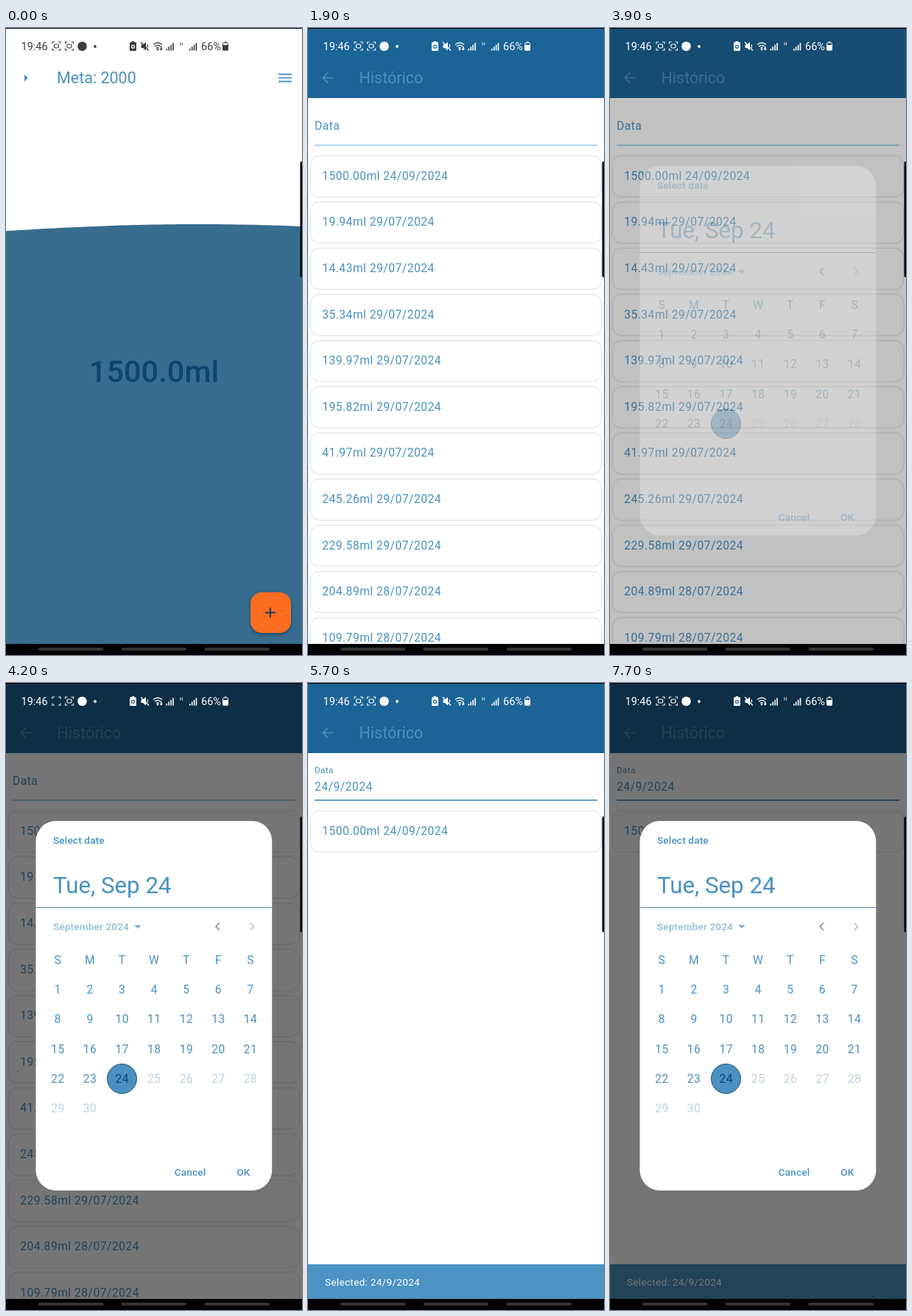
Write an HTML page that moves like this. It is 402 px wide and 850 px high and loops after 8000 ms.

```html
<!DOCTYPE html>
<html lang="pt">
<head>
<meta charset="utf-8">
<title>Hidratação</title>
<style>
  html, body { margin: 0; width: 100%; height: 100%; overflow: hidden; background: #fff; }
  svg { display: block; width: 100vw; height: 100vh; font-family: Roboto, sans-serif; }
  .page, #ripple { transform-origin: 201px 425px; }
  .card { fill: #fff; filter: drop-shadow(0 .8px .8px rgba(0, 0, 0, .3)); }
  .raised { filter: drop-shadow(0 2px 2.5px rgba(0, 0, 0, .35)); }
  .line { fill: none; stroke: currentColor; }
  #status { fill: currentColor; }
</style>
</head>
<body>
<svg viewBox="0 0 402 850" preserveAspectRatio="none">
  <defs>
    <radialGradient id="glow">
      <stop offset=".3" stop-color="#cfe4ec"/>
      <stop offset="1" stop-color="#e4f0f5"/>
    </radialGradient>
  </defs>
  <g id="home" class="page"></g>
  <rect id="scrim" width="402" height="850"/>
  <g id="history" class="page"></g>
  <g id="snack"></g>
  <g id="popup"></g>
  <rect id="barrier" width="402" height="850"/>
  <g id="dialog"></g>
  <g id="status"></g>
  <g id="system"></g>
</svg>
<script>
const LOOP = 8000, STEP = 100;
const BLUE = '#4a91c1', NAVY = '#0b4770', BAR = '#1c6496';
const DP = 402 / 411;
const BODY = 16 * DP, LABEL = 14 * DP, TITLE = 22 * DP;
const $ = id => document.getElementById(id);
const clamp = v => Math.min(1, Math.max(0, v));
const progress = (t, start, length) => clamp((t - start) / length);
const easeOut = (p, power) => 1 - (1 - p) ** power;
const range = n => [...Array(n).keys()];

// Text is placed by the middle of its capitals.
const text = (x, y, size, str, { fill = BLUE, weight = 400, gap = 0, anchor = 'start', extra = '' } = {}) =>
  `<text x="${x}" y="${y + size * 0.3555}" font-size="${size}" fill="${fill}" font-weight="${weight}"
    letter-spacing="${gap}" text-anchor="${anchor}" ${extra}>${str}</text>`;
const body = (x, y, str, opts) => text(x, y, BODY, str, { gap: 0.49, ...opts });
const label = (x, y, str, opts) => text(x, y, LABEL, str, { weight: 500, gap: 0.1, ...opts });
const rect = (x, y, w, h, fill, extra = '') =>
  `<rect x="${x}" y="${y}" width="${w}" height="${h}" fill="${fill}" ${extra}/>`;
const stroke = (d, color = BLUE, width = 1.7, extra = '') =>
  `<path d="${d}" fill="none" stroke="${color}" stroke-width="${width}" ${extra}/>`;

function buildHome() {
  $('home').innerHTML =
    rect(0, 0, 402, 850, '#fff') +
    '<path id="water" fill="#376d8f"/>' +
    '<circle id="ripple" cx="27.5" cy="67.5" r="19.5" fill="url(#glow)"/>' +
    `<path d="M25 63v9.4l4.8-4.7z" fill="${BLUE}"/>` +
    text(69, 67.5, TITLE, 'Meta: 2000') +
    stroke('M370 62.7h18M370 67.6h18M370 72.5h18', BLUE, 1.9) +
    text(201, 465, 41.5, '1500.0ml', { fill: NAVY, weight: 500, anchor: 'middle' }) +
    rect(332, 765, 55, 55, '#fb6d20', 'rx="15.6" class="raised"') +
    stroke('M352.2 792.5h13.6M359 785.7v13.6', '#153f5c', 1.9);
}

function buildHistory() {
  const entries = ['1500.00ml 24/09', '19.94ml 29/07', '14.43ml 29/07', '35.34ml 29/07', '139.97ml 29/07',
    '195.82ml 29/07', '41.97ml 29/07', '245.26ml 29/07', '229.58ml 29/07', '204.89ml 28/07', '109.79ml 28/07'];
  const cards = entries.map((entry, i) => {
    const y = 200.3 + i * 64 * DP;
    return rect(4, y - 26.5, 394, 54.8, '#fff', 'rx="11.7" class="card"') + body(19.2, y, entry + '/2024');
  });
  $('history').innerHTML =
    rect(0, 0, 402, 850, '#fff') +
    rect(0, 0, 402, 95, BAR) +
    stroke('M35 67.5H20.5M27.5 60.3l-7.2 7.2l7.2 7.2', BLUE, 1.6) +
    text(69.5, 67, TITLE, 'Histórico') +
    `<g id="hint">${body(0, 0, 'Data')}</g>` +
    body(9, 140, '24/9/2024', { extra: 'id="value"' }) +
    rect(9, 158, 384, 1.7, BLUE, 'id="underline"') +
    cards[0] + `<g id="others">${cards.slice(1).join('')}</g>`;

  $('snack').innerHTML = rect(0, 788, 402, 62, '#4c93c3') +
    text(23, 812, LABEL, 'Selected: 24/9/2024', { fill: '#fff', gap: 0.24, extra: 'id="snackText"' });
  $('popup').innerHTML = rect(47, 77.5, 83.5, 43, '#fff', 'rx="21.5" class="card"') +
    text(88.5, 99.5, LABEL, 'Select all', { anchor: 'middle' });
}

function buildDialog() {
  const column = i => 70.5 + i * 43.6;
  const row = i => 375.5 + i * 40.2;
  const weekdays = [...'SMTWTFS'].map((d, i) => body(column(i), row(0), d, { anchor: 'middle' }));
  const days = range(30).map(i => {
    const day = i + 1;
    return body(column(i % 7), row(1 + Math.floor(i / 7)), day, {
      anchor: 'middle',
      fill: day === 24 ? NAVY : BLUE,
      extra: day > 24 ? 'opacity=".38"' : ''
    });
  });
  $('dialog').innerHTML =
    rect(40.5, 187, 320.8, 501, '#fff', 'rx="27.4"') +
    label(64, 212.8, 'Select date') +
    text(64, 273.5, 32 * DP, 'Tue, Sep 24') +
    rect(40.5, 304, 320.8, 1, '#4d88ae') +
    label(64, 330.3, 'September 2024', { extra: 'opacity=".6"' }) +
    `<path d="M174 328h9.8l-4.9 4.9z" fill="${BLUE}" opacity=".65"/>` +
    stroke('M290 325.2l-5 5l5 5', '#5f8296', 1.7, 'opacity=".8"') +
    stroke('M331.5 325.2l5 5l-5 5', '#5f8296', 1.7, 'opacity=".45"') +
    `<circle cx="157.5" cy="536.5" r="20" fill="${BLUE}" stroke="#1c4f70"/>` +
    weekdays.join('') + days.join('') +
    rect(290, 643, 64, 40, '#b9c6ce', 'rx="20" opacity=".45" id="press"') +
    label(250, 663, 'Cancel', { anchor: 'middle' }) +
    label(322.3, 663, 'OK', { anchor: 'middle' });
}

function buildSystem() {
  const ink = 'currentColor';
  const corners = x => stroke(
    `M${x - 5.5} 21.5v-2.5h3M${x + 2.5} 19h3v2.5M${x + 5.5} 27.5v2.5h-3M${x - 2.5} 30h-3v-2.5`, ink, 1.1);
  const lens = (x, id) => `<g id="${id}">` +
    `<rect x="${x - 3}" y="22" width="6" height="5" rx="1.5" class="line" stroke-width="1.2"/></g>`;
  const bars = x => range(4).map(i => rect(x + i * 2.9, 28 - i * 2.6, 1.6, 2.5 + i * 2.6, ink)).join('');
  $('status').innerHTML =
    text(20.5, 24.7, 14.5, '19:46', { fill: ink }) +
    corners(68.5) + lens(68.5, 'lens') + corners(86) + lens(86, 'lens2') +
    '<circle cx="103.5" cy="24.8" r="6.3"/><circle cx="121" cy="25" r="1.9"/>' +
    '<path d="M168 20.5q0-1.3 1.3-1.3h1.4v-1.2h3.6v1.2h1.4q1.3 0 1.3 1.3v9.2q0 1.3-1.3 1.3h-6.4q-1.3 0-1.3-1.3z"/>' +
    '<circle id="batteryHole" cx="172.5" cy="25.3" r="2" fill="none" stroke-width="1.2"/>' +
    '<path d="M183.500 22.500h2.500l4-3.500v11.500l-4-3.500h-2.500z"/>' +
    stroke('M183 19l11 11.500M192 22.500q1.500 2 0 4', ink, 1.3) +
    stroke('M200 22.5q6-5 12 0M202 25q4-3.400 8 0M204 27.400q2-1.700 4 0', ink, 1.3) +
    '<circle cx="206" cy="29.2" r="1.2"/><path d="M210 25h1.500v3h1.500l-2.300 2.500l-2.200-2.500h1.500z"/>' +
    bars(217.5) + text(236, 21.5, 6.5, 'H', { fill: ink }) + bars(249) +
    text(265, 24.7, 14.5, '66%', { fill: ink }) +
    '<path d="M294 23v6q0 1.800 1.800 1.800h4.400q1.800 0 1.800-1.800v-6z"/>' +
    stroke('M294.500 24v-2.500q0-1.500 1.500-1.500h4q1.500 0 1.500 1.500v2.500M296.500 19h3', ink, 1);

  $('system').innerHTML =
    rect(0, 0, 402, 1, '#000') + rect(0, 835, 402, 15, '#000') +
    [44, 156.5, 269.5].map(x => rect(x, 840, 88.5, 4, '#343434', 'rx="2"')).join('') +
    rect(399.5, 181, 6, 157, '#000', 'rx="2"');
}

const show = (id, on) => $(id).setAttribute('display', on ? 'inline' : 'none');
const fade = (id, amount) => { $(id).style.opacity = amount; show(id, amount > 0); };
const zoom = (id, scale) => { $(id).style.transform = `scale(${scale})`; };

function waterPath(t) {
  const length = 1440, crest = 260 - t * 0.552, height = 16 - t / 280;
  const points = range(68).map(i => {
    const x = i * 6;
    return `${x} ${(282 - height * Math.cos((x - crest) * 2 * Math.PI / length)).toFixed(2)}`;
  });
  return `M${points.join('L')}V850H0Z`;
}

function render(t) {
  const push = progress(t, 1368, 300);
  const pushed = easeOut(push, 3);
  show('home', push < 1);
  if (push < 1) $('water').setAttribute('d', waterPath(t));
  show('ripple', t >= 1300);
  zoom('home', 1 + 0.05 * pushed);
  fade('scrim', push < 1 ? 0.6 * progress(push, 0.2075, 0.21) : 0);
  zoom('history', 0.85 + 0.15 * pushed);
  fade('history', progress(push, 0.125, 0.125));

  const filtered = t >= 5030;
  const float = easeOut(progress(t, 5030, 167), 3);
  $('hint').setAttribute('transform', `translate(9 ${132 - 14 * float}) scale(${1 - 0.25 * float})`);
  show('value', filtered);
  show('others', !filtered);
  $('underline').setAttribute('fill', filtered ? BLUE : '#9fd3ea');

  const rise = progress(t, 5035, 250);
  show('snack', rise > 0);
  $('snack').setAttribute('transform', `translate(0 ${47 * (1 - easeOut(rise, 2))})`);
  $('snackText').setAttribute('opacity', rise);
  show('popup', t >= 6800 && t < 7600);

  const closing = 1 - progress(t, 5040, 160);
  const open = t < 5600 ? progress(t, 3860, 150) * closing : progress(t, 7550, 150);
  fade('dialog', open);
  fade('barrier', 0.54 * open ** 0.6);
  show('press', t >= 5000 && t < 5300);

  const light = push > 0.4;
  $('status').style.color = light ? '#fff' : '#3d3d3d';
  $('batteryHole').setAttribute('stroke', light ? BAR : '#fff');
  show('lens', Math.floor((t + 300) / 500) % 2 === 0);
}

buildHome();
buildHistory();
buildDialog();
buildSystem();
render(0);

let start;
function tick(now) {
  start ??= now;
  render(Math.floor((now - start) % LOOP / STEP) * STEP);
  requestAnimationFrame(tick);
}
requestAnimationFrame(tick);
</script>
</body>
</html>
```
